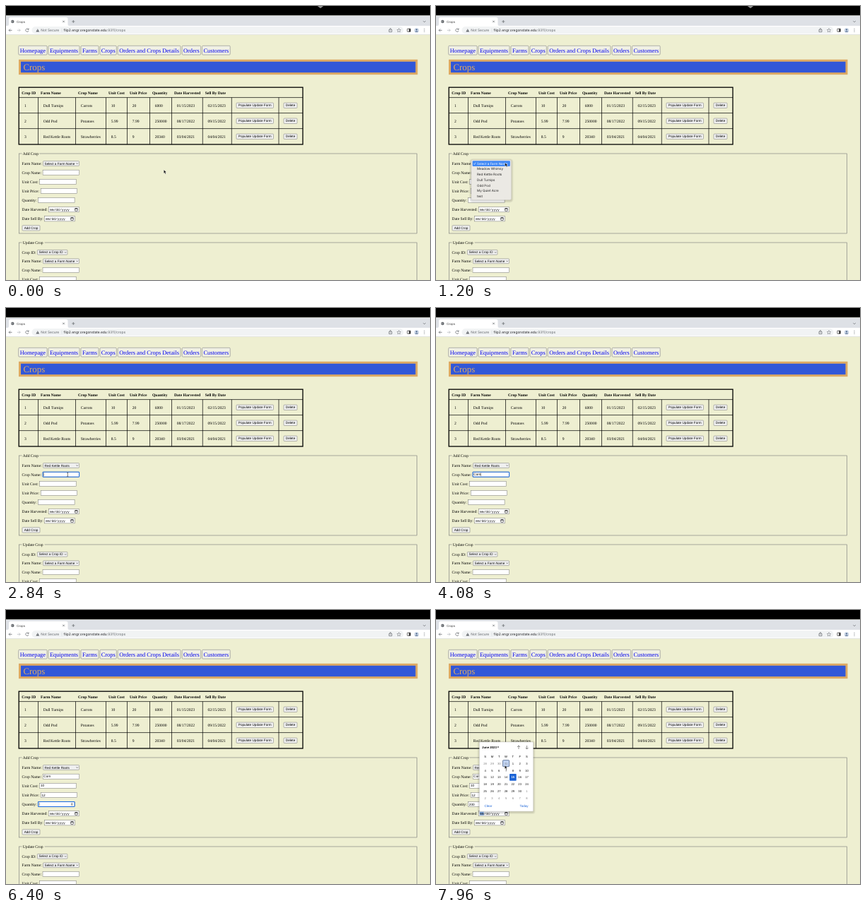
An HTML page for the animation above (8 s loop, 600 px wide and 388 px high).

```html
<!DOCTYPE html>
<html lang="en">
<head>
<meta charset="utf-8">
<title>Crops</title>
<style>
  html, body { margin: 0; width: 100%; height: 100%; overflow: hidden; background: #eeefd1; }
  svg { display: block; width: 600px; height: 388px; }
  text { white-space: pre; text-rendering: geometricPrecision; }
  .serif { font-family: "Liberation Serif", serif; }
  .sans { font-family: "Liberation Sans", sans-serif; }
  .ui { font-family: Inter, sans-serif; }
  .mono { font-family: "Liberation Mono", monospace; }
</style>
</head>
<body>
<svg viewBox="0 0 600 388"><g id="page"></g><g id="live"></g></svg>
<script>
const LOOP = 8000;
const FARMS = ["Meadow Whimsy", "Red Kettle Roots", "Dull Turnips", "Odd Pod", "My Quiet Acre", "test"];
const PICK = FARMS[1];
const MENU = ["Select a Farm Name", ...FARMS];

// Drawing helpers returning SVG markup
const text = (x, y, s, size = 5.6, font = "serif", extra = "") =>
  `<text x="${x}" y="${y}" font-size="${size}" class="${font}" ${extra}>${s}</text>`;
const rect = (x, y, w, h, fill, stroke = "none", r = 0, sw = 0.5) =>
  `<rect x="${x}" y="${y}" width="${w}" height="${h}" rx="${r}" fill="${fill}" stroke="${stroke}" stroke-width="${sw}"/>`;
const path = (d, stroke = "#5f6368", sw = 0.7, fill = "none") =>
  `<path d="${d}" fill="${fill}" stroke="${stroke}" stroke-width="${sw}"/>`;
const circle = (x, y, r, fill, stroke = "none", sw = 0.6) =>
  `<circle cx="${x}" cy="${y}" r="${r}" fill="${fill}" stroke="${stroke}" stroke-width="${sw}"/>`;
const shadow = (x, y, w, h, r) => [3, 2, 1].map(d =>
  rect(x - d, y - d + 1, w + 2 * d, h + 2 * d, "rgba(0,0,0,.05)", "none", r + d)).join("");

const button = (x, y, w, label) =>
  rect(x, y - 3.7, w, 7.4, "#f0f0f0", "#767676", 1) +
  text(x + w / 2, y + 1.65, label, 4.67, "sans", 'text-anchor="middle"');
const select = (x, y, w, label) =>
  rect(x, y - 3.4, w, 6.8, "#f0f0f0", "#767676", 0.8) +
  text(x + 2.1, y + 1.65, label, 4.67, "sans") +
  path(`M${x + w - 4} ${y - .6}l1.2 1.2 1.2-1.2`, "#222", 0.6);
const input = (x, y, w = 51.5, value = "") =>
  rect(x, y - 3.5, w, 7, "#fff", "#767676") + text(x + 1.2, y + 1.65, value, 4.67, "sans");
const dateInput = (x, y) =>
  rect(x, y - 3.6, 42.6, 7.2, "#fff", "#767676") +
  text(x + 1.5, y + 1.4, "mm/dd/yyyy", 4.6, "mono") +
  rect(x + 37, y - 1.6, 3.6, 3.6, "none", "#111", 0.3, 0.6) +
  path(`M${x + 37} ${y - 1.2}h3.6`, "#111", 0.9);
const label = (y, s) => text(22.6, y + 1.7, s);

function browser() {
  let s = rect(0, 0, 600, 13.5, "#000") + rect(0, 13.5, 600, 14.5, "#dee1e6") +
    `<path d="M2 28Q4 28 4 26V18.5Q4 16 6.5 16H85Q87.5 16 87.5 18.5V26Q87.5 28 89.5 28Z" fill="#fff"/>` +
    rect(0, 28, 600, 12.5, "#fff") + rect(0, 40, 600, 0.6, "#d8dade") +
    rect(36.5, 29.3, 526, 10, "#f1f3f4", "none", 5);
  s += circle(9.3, 22, 2.2, "#5f6368") + path("M7.5 21.3l1.5 .6v1.5m.7-3l1 1", "#fff", 0.5) +
    text(15, 23.6, "Crops", 4.2, "ui", 'fill="#333"') +
    path("M80.2 20.7l2.6 2.6m0-2.6l-2.6 2.6M93.3 22h4M95.3 20v4M590.4 21.2l1.7 1.7 1.7-1.7");
  s += path("M8.5 34.4h-4.4m2-2l-2 2 2 2") +
    path("M15.8 34.4h4.4m-2-2l2 2-2 2", "#b4b7bb") +
    path("M31.8 33a2.2 2.2 0 1 0 .3 2M32.1 31.6v1.8h-1.8") +
    path("M44.8 32.2l2.4 4.2h-4.8z", "none", 0, "#5f6368") + rect(44.5, 33.6, 0.6, 1.4, "#fff") +
    text(49.3, 36.1, "Not Secure", 4.9, "ui", 'fill="#5f6368"') +
    rect(78.8, 31.8, 0.4, 5, "#c4c7cb") +
    text(81.6, 36.1, "flip2.engr.oregonstate.edu:9311/crops", 4.9, "ui",
      'fill="#5f6368"').replace("flip2.engr.oregonstate.edu", '<tspan fill="#202124">$&</tspan>');
  s += path("M543 33.5h-1v3.2h4v-3.2h-1M544 35v-3.4m-1.2 1.2l1.2-1.2 1.2 1.2") +
    path("M556 31.7l.8 1.8 1.9 .2-1.4 1.3 .4 1.9-1.7-1-1.7 1 .4-1.9-1.4-1.3 1.9-.2z", "#5f6368", 0.5) +
    rect(567.9, 32.2, 4.4, 4.2, "none", "#333", 0.3, 0.7) + rect(570.2, 32.2, 2.1, 4.2, "#333") +
    circle(581, 34.4, 3.2, "#c7d3e4") + circle(581, 33.5, 1.1, "#50698c") +
    path("M578.8 36.7q2.2-2.6 4.4 0", "none", 0, "#50698c");
  return s + [32.6, 34.4, 36.2].map(y => circle(592, y, 0.5, "#5f6368")).join("");
}

function header() {
  const nav = [[17.7, 40.4, "Homepage"], [60, 44, "Equipments"], [106, 25, "Farms"], [133, 23.3, "Crops"],
    [158.2, 88.8, "Orders and Crops Details"], [249.2, 26.4, "Orders"], [277.6, 39.6, "Customers"]];
  return nav.map(([x, w, s]) => rect(x, 56.3, w, 12.8, "#f0f0e4", "#858585", 1.2, 0.6) +
      text(x + w / 2, 65.7, s, 8.4, "serif", 'fill="#0000ee" text-anchor="middle"')).join("") +
    rect(18, 75.8, 564.5, 21.4, "#dda963") + rect(21, 78.8, 558.5, 15.4, "#3157d8") +
    text(24.4, 90.9, "Crops", 12.9, "serif", 'fill="#dda963"');
}

function table() {
  const heads = ["Crop ID", "Farm Name", "Crop Name", "Unit Cost", "Unit Price", "Quantity", "Date Harvested", "Sell By Date"];
  const headX = [22.3, 49, 102, 145, 175, 207, 238, 281.7];
  const rows = [
    [1, FARMS[2], "Carrots", 10, 20, 6000, "01/15/2023", "02/15/2023"],
    [2, FARMS[3], "Potatoes", 5.99, 7.99, 250000, "08/17/2022", "09/15/2022"],
    [3, FARMS[1], "Strawberries", 8.5, 9, 20340, "03/04/2021", "04/04/2021"]];
  let s = rect(18.2, 115.2, 401.8, 80.8, "none", "#000", 0, 1.3) +
    heads.map((h, i) => text(headX[i], 124.6, h, 5.6, "serif", 'font-weight="bold"')).join("");
  rows.forEach((row, r) => {
    const y = 140.8 + r * 22;
    s += path(`M18 ${y - 11.2}H420`, "#000", 0.7) +
      row.map((v, i) => text(headX[i] + 3.7, y + 1.8, v)).join("") +
      button(326, y, 52.5, "Populate Update Form") + button(393, y, 19, "Delete");
  });
  return s + path([45.5, 98.5, 141.5, 171.5, 203.5, 234.5, 278.3, 319.3, 386].map(x => `M${x} 129.6V196`).join(""), "#000", 0.7);
}

const fieldset = (y, h, legend, w) =>
  rect(18.6, y, 562.8, h, "none", "#777", 0, 0.6) + rect(22.6, y - 2, w, 4, "#eeefd1") + text(23.8, y + 1.7, legend);

function forms() {
  const names = ["Farm Name:", "Crop Name:", "Unit Cost:", "Unit Price:", "Quantity:", "Date Harvested:", "Date Sell By:"];
  return fieldset(209, 113, "Add Crop", 24.5) + names.map((s, i) => label(223 + i * 13.05, s)).join("") +
    dateInput(60.6, 288.2) + dateInput(54.7, 301.3) + button(23, 314.4, 25, "Add Crop") +
    fieldset(335, 130, "Update Crop", 32) +
    label(348.8, "Crop ID:") + select(44.4, 348.8, 42.5, "Select a Crop ID") +
    label(361.3, "Farm Name:") + select(52.5, 361.3, 51, MENU[0]) +
    label(373.9, "Crop Name:") + input(52, 373.9) +
    label(387, "Unit Cost:") + input(47.7, 387);
}

// Fields with focus interval and typing times
const FIELDS = [
  { x: 52.1, y: 235.7, value: "Corn", focus: 2600, blur: 4160, keys: [3480, 3620, 3760, 3900] },
  { x: 47.7, y: 248.8, value: "10", focus: 4160, blur: 5280, keys: [4560, 4720], number: true },
  { x: 49.2, y: 261.9, value: "12", focus: 5280, blur: 6320, keys: [5760, 5920], number: true },
  { x: 45.6, y: 275, value: "200", focus: 6320, blur: 7480, keys: [6600, 6760, 6880], number: true }];
const GLYPH = { C: .722, o: .556, r: .333, n: .556 };

function field(f, t) {
  const typed = f.keys.filter(k => t >= k);
  const value = f.value.slice(0, typed.length);
  let s = input(f.x, f.y, 51.5, value);
  if (t < f.focus || t >= f.blur) return s;
  s += rect(f.x, f.y - 3.5, 51.5, 7, "none", "#1668e3", 0.5, 1);
  if (f.number) {
    const x = f.x + 47.6;
    s += rect(x - 1.7, f.y - 2.5, 3.4, 5, "#e9e9e9", "none", 0.5) +
      path(`M${x - 1} ${f.y - .5}l1-1.3 1 1.3zM${x - 1} ${f.y + .5}l1 1.3 1-1.3z`, "none", 0, "#444");
  }
  const since = t - (typed.at(-1) ?? f.focus);
  if (since % 1000 < 500) {
    const w = [...value].reduce((sum, c) => sum + (GLYPH[c] ?? .556), 0) * 4.67;
    s += rect(f.x + 1.3 + w, f.y - 2.4, 0.4, 4.8, "#000");
  }
  return s;
}

// Pointer waypoints: time, x, y
const POINTER = [[0, 223.3, 232], [240, 223.3, 232], [880, 97.8, 222], [1280, 97.8, 222], [1720, 88, 237.5],
  [2200, 88, 237.5], [2480, 87.3, 235.8], [6960, 87.3, 235.8], [7200, 98.2, 286], [7520, 98.2, 286], [7880, 97.3, 220], [8000, 97.3, 220]];
function pointerAt(t) {
  const i = POINTER.findIndex(p => p[0] > t);
  const [a, b] = [POINTER[i - 1], POINTER[i]];
  const u = (t - a[0]) / (b[0] - a[0]), e = u * u * (3 - 2 * u);
  return [a[1] + (b[1] - a[1]) * e, a[2] + (b[2] - a[2]) * e];
}
function pointer(t, [x, y]) {
  if (t >= 3440 && t < 6960) return "";
  if (t >= 2240 && t < 7040)
    return path(`M${x - 1} ${y - 2.7}q1 0 1 .8v3.8q0 .8-1 .8m2-5.4q-1 0-1 .8m0 3.8q0 .8 1 .8`, "#222", 0.6);
  return path(`M${x} ${y}v5l1.2-1.1 .9 2 .9-.4-.9-2h1.6z`, "#fff", 0.4, "#000");
}

function menu(py) {
  const hover = Math.max(0, Math.min(6, Math.round((py - 223) / 7.7)));
  return shadow(50, 218, 56.5, 56.5, 2) + rect(50, 218, 56.5, 56.5, "#ebe9e4", "#c9c7c2", 2, 0.4) +
    MENU.map((s, i) => {
      const y = 223.1 + i * 7.7, on = i === hover, color = on ? "#fff" : "#222";
      return (on ? rect(51.6, y - 3.8, 53.3, 7.6, "#4088f5", "none", 1.2) : "") +
        (i ? "" : path(`M53.4 ${y + .2}l1 1.2 1.6-2.8`, color, 0.6)) +
        text(58, y + 1.6, s, 4.55, "ui", `fill="${color}"`);
    }).join("");
}

function calendar([px, py]) {
  const colX = c => 69.6 + c * 9.82, rowY = r => 217.2 + r * 9.86;
  const center = 'text-anchor="middle" ';
  let s = rect(61.8, 285.7, 5.9, 5, "#8db8f3") + text(62.1, 289.6, "mm", 4.6, "mono") +
    shadow(61.5, 187, 76, 98, 1) + rect(61.5, 187, 76, 98, "#fff", "#ccc", 1, 0.4) +
    text(65, 195.8, "June 2023", 4.3, "sans", 'font-weight="bold"') +
    path("M86.6 193.6h2.6l-1.3 1.6z", "none", 0, "#222") +
    path("M117 197v-5m-2 2l2-2 2 2M128.6 192v5m-2-2l2 2 2-2", "#444", 0.6) +
    [..."SMTWTFS"].map((d, c) => text(colX(c), 208.8, d, 4.2, "sans", center)).join("");
  const hoverCol = Math.round((px - 69.6) / 9.82), hoverRow = Math.round((py - 217.2) / 9.86);
  for (let i = 0; i < 42; i++) {
    const n = i - 3, c = i % 7, r = Math.floor(i / 7), x = colX(c), y = rowY(r);
    const outside = n < 1 || n > 30, chosen = n === 15;
    if (chosen) s += rect(x - 4.8, y - 4.8, 9.6, 9.6, "#1a63d6", "none", 0.7);
    else if (c === hoverCol && r === hoverRow) s += rect(x - 4.5, y - 4.5, 9, 9, "#c2d5f4", "#37517c", 0.7, 0.7);
    const color = chosen ? "#fff" : outside ? "#808080" : "#111";
    s += text(x, y + 1.5, n < 1 ? n + 31 : n > 30 ? n - 30 : n, 4.2, "sans",
      center + `fill="${color}"` + (chosen ? ' font-weight="bold"' : ""));
  }
  return s + text(68.6, 278.9, "Clear", 4.5, "sans", 'fill="#1a63d6"') +
    text(118.4, 278.9, "Today", 4.5, "sans", 'fill="#1a63d6"');
}

function scene(t) {
  const p = pointerAt(t);
  return (t < 2080 ? path("M440.8 0h8.4l-3.4 2.8q-.8 .6-1.6 0z", "none", 0, "#8c8c8c") : "") +
    select(52.5, 223, 51, t < 2080 ? MENU[0] : PICK) +
    FIELDS.map(f => field(f, t)).join("") +
    (t >= 1000 && t < 2080 ? menu(p[1]) : "") +
    (t >= 7600 ? calendar(p) : "") + pointer(t, p);
}

const live = document.getElementById("live");
document.getElementById("page").innerHTML = browser() + header() + table() + forms();
const start = performance.now();
function draw() {
  live.innerHTML = scene(Math.max(0, performance.now() - start) % LOOP);
  requestAnimationFrame(draw);
}
draw();
</script>
</body>
</html>
```
